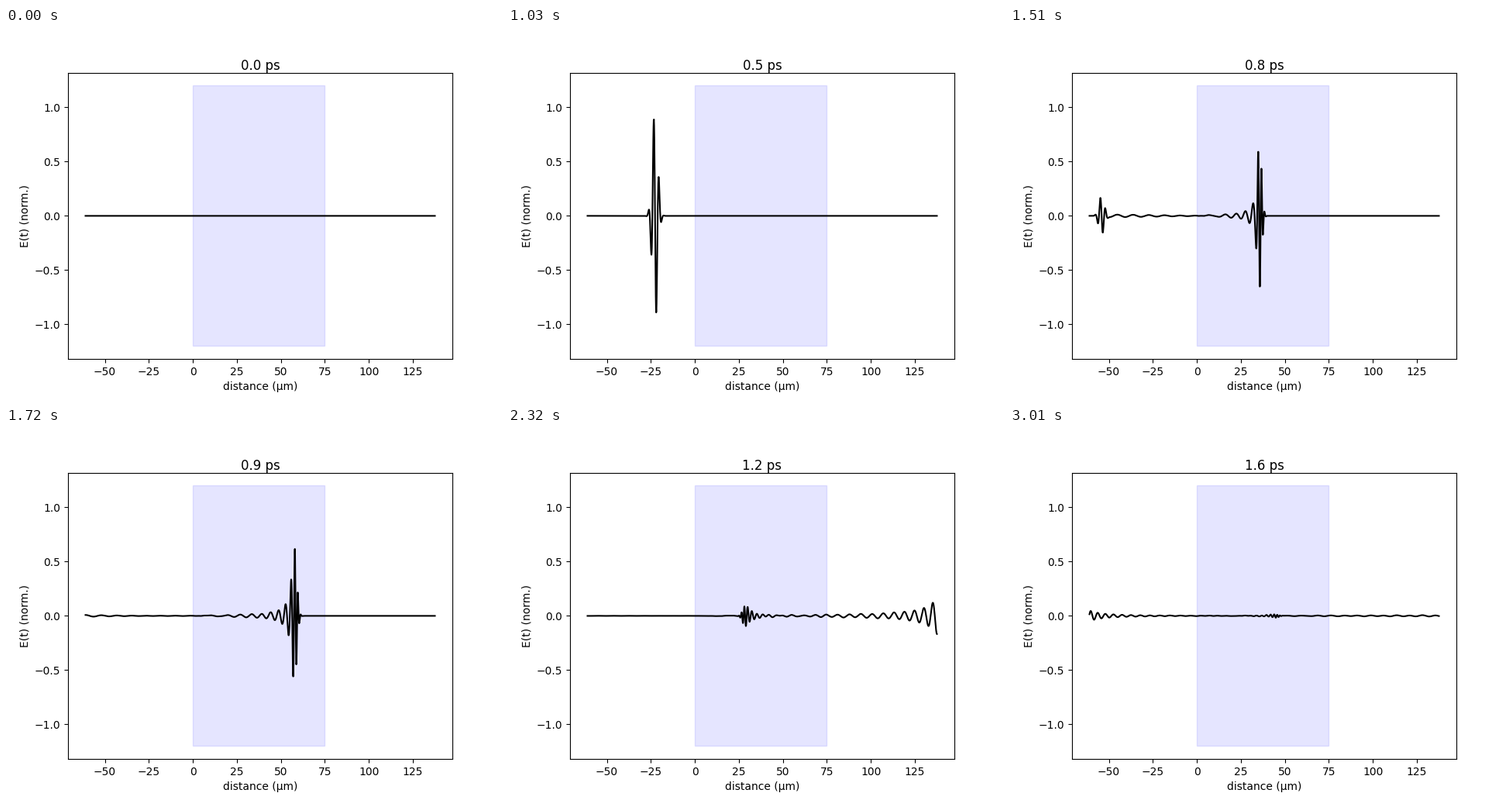
Animation, 640 px wide and 480 px high, one loop 3.04 s. Source, as a matplotlib script:

```python
import numpy as np
import matplotlib.pyplot as plt
from matplotlib.animation import FuncAnimation

# Units: micrometres, picoseconds, terahertz
C = 299.792
X_MIN, X_MAX, SLAB = -61.0, 137.5, 75.0
STEP = 0.016                       # simulated time per picture
STEPS = 100

# Few-cycle pulse, launched at the left edge
F_C, SIGMA, T_PEAK = 100.0, 0.005, 0.4

# Lorentz medium
EPS_INF, F_0, STRENGTH, DAMPING = 2.2, 30.0, 850.0, 0.2

TICK = 10                          # ms per animation frame
LOOP = 3040


def slab_field(x, f):
    """Field of a unit plane wave meeting the slab, for every x and f."""
    k = 2 * np.pi * f / C
    n = np.sqrt(EPS_INF + STRENGTH / (F_0**2 - f**2 - 1j * DAMPING * f))
    r = (1 - n) / (1 + n)
    q = np.exp(1j * k * n * SLAB)
    den = 1 - (r * q) ** 2
    back = r * (1 - q**2) / den
    fwd = 2 / (1 + n) / den
    left, mid, right = (x[m][:, None] for m in
                        (x < 0, (x >= 0) & (x <= SLAB), x > SLAB))
    wave = np.exp(1j * k * left)
    return np.vstack([
        wave + back * wave.conj(),
        fwd * np.exp(1j * k * n * mid)
        - fwd * r * q * np.exp(1j * k * n * (SLAB - mid)),
        fwd * q * (1 - r) * np.exp(1j * k * (right - SLAB)),
    ])


def propagate(x):
    """E(x, t) as one column per time step."""
    df = 0.125
    f = np.arange(df, 230, df)
    t = np.arange(STEPS) * STEP - (T_PEAK - X_MIN / C)
    spectrum = 1j * df * SIGMA * np.sqrt(2 * np.pi) * np.exp(
        -2 * (np.pi * SIGMA * (f - F_C)) ** 2)
    phases = spectrum[:, None] * np.exp(-2j * np.pi * np.outer(f, t))
    return (slab_field(x, f) @ phases).real


def step_at(ms):
    """The quiet lead-in runs slightly slower than the rest."""
    if ms < 760:
        return max(0, 4 + 6 * (ms - 130) // 190)
    return 24 + (ms - 760) // 30


x = np.linspace(X_MIN, X_MAX, 1700)
field = propagate(x)

fig, ax = plt.subplots(figsize=(6.4, 4.8), dpi=100)
ax.add_patch(plt.Rectangle((0, -1.2), SLAB, 2.4, color="blue", alpha=0.1))
line, = ax.plot(x, field[:, 0], color="black", lw=1.5)
margin = 0.05 * (X_MAX - X_MIN)
ax.set_xlim(X_MIN - margin, X_MAX + margin)
ax.set_ylim(-1.32, 1.32)
ax.set_xlabel("distance (µm)")
ax.set_ylabel("E(t) (norm.)")
clock = ax.text(0.5, 1, "0.0 ps", transform=ax.transAxes, fontsize=12,
                ha="center", va="bottom")


def update(i):
    step = step_at(i * TICK)
    line.set_ydata(field[:, step])
    clock.set_text(f"{step * STEP:.1f} ps")
    return line, clock


anim = FuncAnimation(fig, update, frames=LOOP // TICK, interval=TICK,
                     repeat=True, repeat_delay=0)
plt.show()
```
